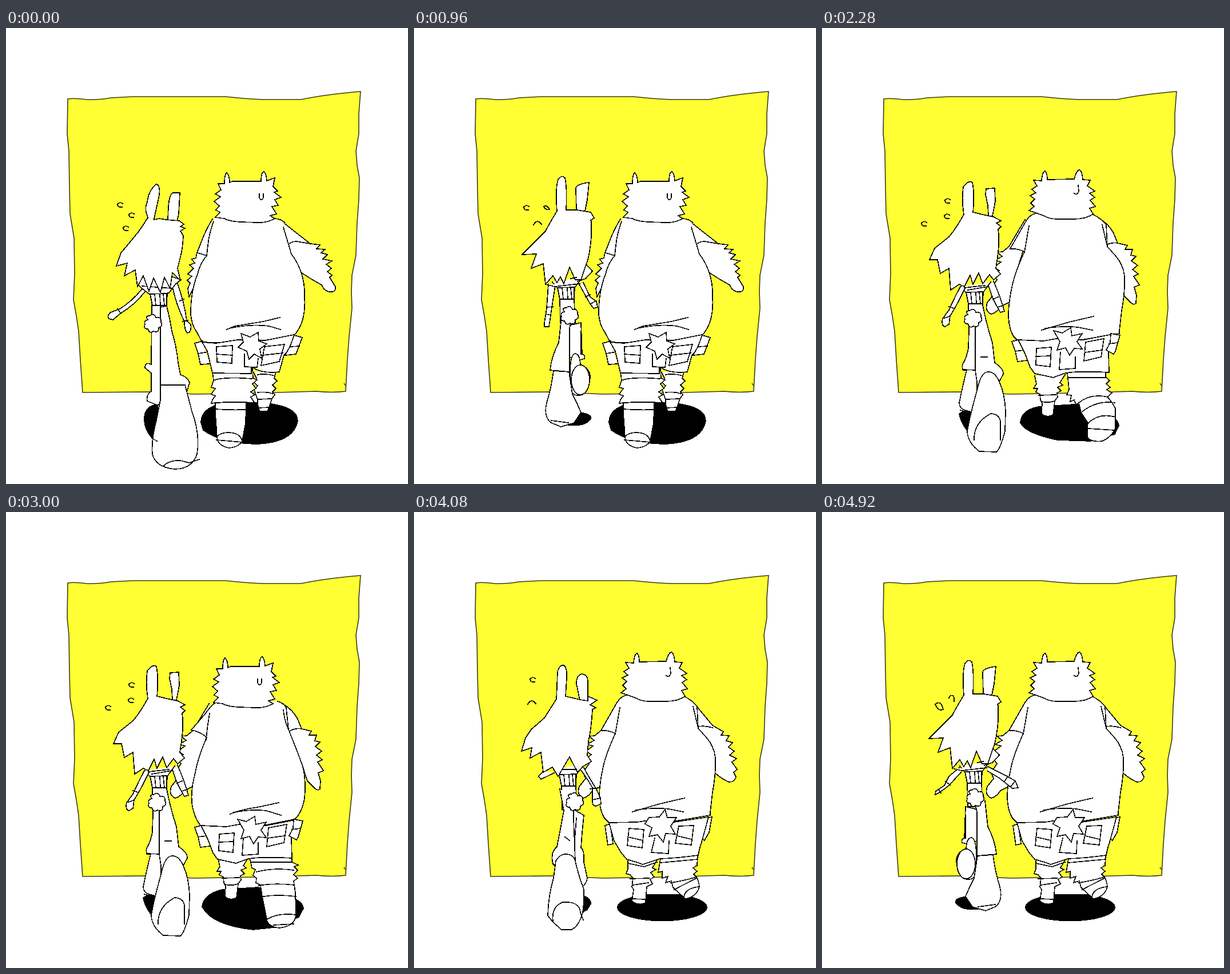
These frames come from a looping animation (703 by 797 pixels, 5040 ms). An HTML page:

```html
<!DOCTYPE html>
<html lang="en">
<head>
<meta charset="utf-8">
<title>Walk</title>
<style>
html, body { margin: 0; width: 100%; height: 100%; overflow: hidden; background: #fff; }
svg { display: block; width: 703px; height: 797px; }
.ink { fill: #fff; stroke: #000; stroke-width: 1.6; stroke-linejoin: round; stroke-linecap: round; shape-rendering: crispEdges; }
.l { fill: none; }
.s { fill: #000; }
.hop, .long, .short { visibility: hidden; animation: hop .72s step-end infinite; }
.long { animation: long .84s step-end infinite; }
.short { animation: short .84s step-end infinite; }
@keyframes hop { 0% { visibility: visible } 16.6666%, 100% { visibility: hidden } }
@keyframes long { 0% { visibility: visible } 21.4285%, 100% { visibility: hidden } }
@keyframes short { 0% { visibility: visible } 14.2857%, 100% { visibility: hidden } }
</style>
</head>
<body>
<svg viewBox="0 0 703 797">
<defs>
  <!-- bear: heads -->
  <g id="headA">
    <path d="M366 331L374 322 367 318 373 311 364 303 375 295 366 290 376 283 371 272 382 272Q382 256 386 253 391 258 391 270L396 268H446Q446 253 451 251 455 254 456 267L470 262 467 277 475 285 469 287 481 296 470 300 476 310 465 312 473 325 462 328 470 333Q455 341 440 340L410 339Q390 338 382 333Z"/>
    <path class="l" d="M443 290Q442 300 447 300 451 299 450 290"/>
  </g>
  <g id="headB">
    <path d="M374 320L362 316 371 309 365 303 372 296 364 290 374 285 367 279 376 273 370 263 384 264Q385 249 390 247 394 250 394 262L441 261Q445 246 450 245 455 247 456 262L469 263 464 273 477 282 468 286 477 293 469 298 478 309 468 312 474 322Q462 331 440 331H410Q395 330 390 326Z"/>
    <path class="l" d="M441 286Q447 290 449 282L448 272"/>
  </g>

  <!-- bear: arms and bodies -->
  <path id="armL" d="M355 335L327 382 316 391 306 392 315 399 303 406 313 409 301 418 310 424 300 432 306 440 296 455 300 466 289 480Q284 495 296 500 305 498 312 487L330 478 333 450 352 388"/>
  <path id="armR" d="M485 336Q502 346 510 362L517 379 534 383 530 390 543 390 540 400 549 402 541 410 552 418 543 425 553 433 545 437 555 452 546 456 550 470 549 484Q545 488 540 483L527 470Q522 455 519 445L494 384M494 384Q505 377 517 379"/>
  <g id="bodyA">
    <path d="M361 334Q354 345 345 365L334 393 332 402 325 404 330 411 321 414 328 420 318 430 325 434 317 441 322 446 318 455 320 470L335 440 351 398M334 393Q340 394 351 398"/>
    <path d="M485 340L500 352 532 377 549 379 543 386 558 387 551 393 562 396 554 404 570 407 560 413 569 420 562 426 570 432 566 436 576 452Q577 461 570 461 562 462 556 456L552 449Q535 440 517 428 505 413 493 381M493 381Q496 373 508 373L532 377"/>
    <path d="M363 338Q355 360 353 380L351 398Q340 410 335 430 323 460 323 500 325 520 334 532L343 549 430 552 500 540Q508 535 515 520 524 500 522 470 523 450 517 430 512 412 499 395L485 348"/>
    <path d="M366 331L363 338 485 348 487 340 470 333Z" stroke="none"/>
    <path class="l" d="M470 333Q482 334 487 340M386 527L400 521 450 513 479 506M395 524Q430 517 460 521L480 527"/>
  </g>
  <g id="bodyB">
    <path d="M372 320Q362 322 355 333L327 382Q340 381 352 387 335 425 331 445 325 470 324 495 324 520 333 535L341 543H440L518 530V525L522 490Q528 460 527 430 525 410 512 395L497 378 495 340Q488 330 472 322"/>
    <path class="l" d="M360 342L352 388M488 340L497 378M382 524L430 510 473 500M388 521Q420 516 445 519L471 524"/>
  </g>
  <g id="bodyE">
    <path d="M372 328Q355 342 349 352L324 381Q340 384 351 394 335 430 330 460 322 490 326 515 330 535 340 548L430 552 505 537Q518 525 522 500 525 470 519 445 512 425 500 395L494 380 490 342Q486 334 475 331"/>
    <path class="l" d="M356 352L352 378 350 398M485 346Q487 365 494 380M392 528Q410 520 440 516L477 508M398 525Q430 519 455 522L481 530"/>
  </g>

  <!-- bear: shorts -->
  <g id="shortsA">
    <path d="M344 547L330 551 336 569 340 588 356 587M336 569L354 566"/>
    <path d="M343 549L367 551 405 545 453 546 504 536 497 560 486 572 478 601Q455 604 438 597L429 592V604L361 603 358 590 352 565Z"/>
    <path d="M504 537L518 541 507 570 488 572 496 558ZM497 557L513 556M368 557L396 555 395 586 369 584ZM368 570L396 572M452 557L487 553 478 583 446 590ZM448 572L484 568M417 570V592L439 593 441 578"/>
    <path d="M411 534L427 540 441 532 442 547 456 552 444 561 447 577 434 570 425 579 421 565 406 558 415 549Z"/>
  </g>
  <g id="shortsB">
    <path d="M334 548L343 545 348 580 339 582ZM510 535L521 533 516 560 508 574 502 570 508 555Z"/>
    <path d="M341 543L390 542 410 539 455 542 515 533 505 570 499 590 497 600Q460 605 430 606L400 616Q390 612 372 607L362 595 350 575Z"/>
    <path d="M376 553L402 555 399 587 373 583ZM374 568L400 574M463 549L489 548 485 582 457 579ZM460 566L485 572M421 570L415 595 445 597 446 575"/>
    <path d="M404 545L411 534 429 533 439 520 443 534 459 534 449 549 457 563 440 562 436 577 426 564 411 567 416 552Z"/>
  </g>
  <g id="shortsE">
    <path d="M341 548L330 551 336 568 340 586 356 584M336 568L351 566"/>
    <path d="M341 548L385 550 408 546 455 548 507 538 499 570 500 605Q450 602 424 606L402 614Q395 612 370 607L362 596 353 572Z"/>
    <path d="M503 537L519 540 511 568 508 573 495 566 502 553ZM500 555L515 553M373 563L399 561 397 595 372 592ZM372 577L398 576M459 552L491 546 486 578 456 585ZM458 570L487 566M415 570L413 600 441 598V578"/>
  </g>
  <path id="starE" d="M405 537L420 541 435 532 437 546 455 542 446 556 455 569 441 568 433 580 426 567 411 571 416 556Z"/>

  <!-- bear: legs and shadows -->
  <path id="farA" d="M473 598L469 612 474 617 466 624 472 630 466 636 470 641 465 648 461 660 457 670H444L441 664 440 650 434 632 440 625 434 620 438 612 433 602M440 606Q455 603 470 608M440 637Q455 635 466 639M441 649L465 648M441 664L461 663"/>
  <g id="nearA">
    <path d="M361 600L363 616 359 628 366 630 359 640 366 643 361 650 359 656 366 655V672L369 715Q370 730 390 734 408 732 413 722L419 690 420 656 434 654 428 645 435 641 428 636 437 630 431 622 439 615 432 612 431 594"/>
    <path class="l" d="M363 616Q380 609 430 613M359 656Q395 652 434 655M366 666Q390 668 420 667M369 714Q375 707 390 707 410 708 413 722M368 720L414 724"/>
  </g>
  <path id="shadeA" class="s" d="M341 690Q341 666 372 658L440 655Q510 658 510 687 503 724 440 727 380 727 345 703Z"/>
  <g id="legsB">
    <ellipse class="s" cx="434" cy="691" rx="78" ry="23.500"/>
    <path d="M410 640H450L470 668H408Z" stroke="none"/>
    <path d="M374 610V624L371 632 378 634 383 640 381 655 384 660 381 680Q393 689 405 683L407 655 417 650 413 642 420 638 414 630 423 625 417 622 425 608M374 614L402 620 425 612M378 641L411 640M383 652L410 648M381 676L405 677"/>
    <path d="M431 606L427 630 434 628V640L444 637 440 648 450 645 453 656Q465 668 475 676 495 672 499 655 498 645 494 638L489 633 495 628 488 622 495 618 496 600M431 613L496 607"/>
    <path class="l" d="M449 648Q470 645 494 638M455 660L494 640M472 672Q475 657 499 655"/>
  </g>
  <path id="farE" d="M371 606L374 620 369 628 376 628 373 634 380 638 381 648 384 654 383 672Q392 680 403 674L406 650 411 643 410 636 417 632 411 626 420 622 415 618 424 604M378 640L408 639M383 651Q395 654 405 650"/>
  <g id="nearE">
    <path d="M426 604L430 622 436 625 432 635 438 640 437 648 445 652 448 672 456 712Q458 725 478 727 505 724 507 705L506 665 503 645 510 640 503 634 510 626 504 620 511 617 500 612V602M428 612H500"/>
    <path class="l" d="M438 629Q470 621 503 626M442 653Q470 648 504 652M450 672Q475 668 507 672M456 712Q475 700 507 704M468 722L503 720"/>
  </g>
  <g id="nearD">
    <path d="M429 602L432 632 428 641 436 642 434 653 441 650 444 658 449 655 453 672 465 690Q462 712 466 718 475 724 490 722 505 716 513 700V665Q505 650 499 645L507 638 498 632 504 628 497 622 503 616 496 610V600M430 611H496"/>
    <path class="l" d="M449 655Q470 638 500 645M453 672Q480 650 512 655M466 690Q485 672 513 680M465 700L512 703"/>
  </g>
  <path id="shadeD" class="s" d="M347 690Q348 668 378 662L455 657Q519 675 519 695L512 710 470 722 411 720Q355 708 347 690Z"/>

  <!-- rabbit: shared bits -->
  <path id="tail" d="M-9-7Q-14-14-6-14 2-20 5-11 15-13 14-3 18 4 10 7 10 17 1 13-6 18-9 9-17 9-14 1-16-6-9-7Z"/>
  <path id="waist" d="M-24-26L-14-14-11 4-10 45H16L14 4 15-16 28-34"/>
  <path id="chest" d="M-15-16L14-17 14 4-11 4ZM-7-16L-5 4M2-16L3 4M8-16L10 4"/>
  <path id="drop" class="l" d="M4-2Q-1-6-5-1-5 5 3 4"/>
  <path id="arch" class="l" d="M-8 3Q-4-5 2-2L6 2"/>

  <g id="hair0">
    <path d="M249 334L245 322Q243 312 247 304 250 282 263 273 270 274 268 292L259 333M283 336L284 312Q286 288 293 288H304L302 325 298 342"/>
    <path d="M247 333Q240 345 231 357L212 380 201 393 193 416 212 411 207 433 226 423 230 452 240 433 250 460 258 437 270 462 277 436 287 455 291 428 305 441 300 420 305 400Q309 385 310 363L305 355 313 350 305 347 311 343 303 337 280 335 268 333 259 335"/>
  </g>
  <g id="hair1">
    <path d="M250 320Q247 280 252 265 258 256 264 262 268 280 266 318M284 318L283 280Q284 273 306 270L303 300 299 320"/>
    <path d="M301 413L312 425 300 438 286 443"/>
    <path d="M250 320Q235 345 230 355L205 380 189 396 214 395 205 420 226 412 230 448 243 433 250 445 256 435 262 447 272 418 282 440 292 440 301 413Q307 400 310 365V338L309 336 315 332 309 322 285 318H266M274 438L284 436M230 448L246 452 290 447"/>
  </g>

  <!-- rabbit: legs -->
  <g id="legs0">
    <path class="s" d="M265 658Q244 660 242 680 240 700 258 720L264 690Z"/>
    <path d="M255 484L254 588Q243 583 243 594L254 603V635Q245 640 247 652L262 658Q268 660 270 654L271 486"/>
    <path d="M270 488L281 486Q287 510 290 530 298 555 301 585L305 606Q318 610 321 620L316 636 270 640Z"/>
    <path d="M270 624L313 624Q320 650 325 670 340 710 334 745 325 771 295 771 262 768 256 745 254 720 262 690L270 650Z"/>
    <path class="l" d="M275 766Q285 755 305 756L320 760 338 754M257 718L264 722"/>
  </g>
  <g id="legs1">
    <path class="s" d="M270 694L290 672Q312 675 309 683 300 697 270 694Z"/>
    <path d="M271 520L292 515 294 570Q300 572 298 578L290 580 272 575ZM292 530V570"/>
    <path d="M273 605Q273 570 282 569 290 570 291 588 308 595 308 610 306 640 290 642 276 643 275 632Z"/>
    <ellipse class="l" cx="291" cy="615" rx="16" ry="26"/>
    <path d="M258 505L253 550Q240 575 238 598L272 601V525L276 505"/>
    <path d="M244 599Q240 630 232 655 226 680 240 690L257 697 280 690 292 672Q285 655 277 640L271 601ZM240 686L270 690"/>
  </g>
  <g id="arms6">
    <path d="M240 447L222 462 214 478 199 488 198 494 206 490 222 478 243 455M216 471L224 477M204 485L208 491"/>
    <path d="M290 445L320 460 338 470 343 482 333 483 310 465 290 453M325 462L319 471M338 470L331 479"/>
  </g>
</defs>

<path d="M108 124Q120 122 140 125 160 126 184 122L222 120H384Q420 124 448 125H516Q560 116 620 111L617 150V185L612 215 614 240 618 262 617 300 614 340 612 397 605 432 604 460 605 490 600 540 597 580 594 635Q570 638 543 635L440 638 330 640 250 636 134 637 130 580 127 530 123 503 118 475 120 430 119 367 112 325 111 280 110 215 107 185ZM591 621L594 625" fill="#ff3" stroke="#3c3c14" stroke-width="1.600"/>

<g class="ink">
  <!-- bear, 840 ms stride -->
  <g class="long" style="animation-delay:-840ms">
    <use href="#shadeA"/><use href="#farA"/><use href="#nearA"/><use href="#bodyA"/><use href="#shortsA"/><use href="#headA"/>
  </g>
  <g class="short" style="animation-delay:-660ms">
    <use href="#shadeD" transform="matrix(-1 0 0 1 860 0)"/><use href="#farA"/><use href="#nearD" transform="matrix(-1 0 0 1 866 -2)"/>
    <g transform="translate(0 -5)"><use href="#bodyA"/><use href="#shortsA"/><use href="#headA"/></g>
  </g>
  <g class="short" style="animation-delay:-540ms">
    <use href="#legsB" transform="matrix(-1 0 0 1 864 0)"/>
    <use href="#bodyA" y="-9"/><use href="#shortsB" transform="matrix(-1 0 0 1 862 0)"/><use href="#headA" y="-11"/>
  </g>
  <g class="long" style="animation-delay:-420ms">
    <path class="s" d="M343 690Q345 668 378 660L440 656Q520 672 520 693L512 708 470 726 432 730Q360 722 343 690Z"/>
    <use href="#farE"/><use href="#nearE"/><use href="#armL"/><use href="#armR"/><use href="#bodyE"/><use href="#shortsE"/><use href="#starE"/><use href="#headA" x="-3" y="2"/>
  </g>
  <g class="short" style="animation-delay:-240ms">
    <use href="#shadeD"/><use href="#farE" x="1" y="2"/><use href="#nearD"/><use href="#armL"/><use href="#armR" y="-3"/><use href="#bodyB" x="2" y="4"/><use href="#shortsE" x="2" y="-3"/><use href="#starE" y="-8"/><use href="#headB" y="3"/>
  </g>
  <g class="short" style="animation-delay:-120ms">
    <use href="#legsB"/><use href="#armL"/>
    <path d="M493 338L522 373 541 384 537 390 551 391 546 400 557 403 550 411 560 418 552 425 564 431 556 437 565 450 559 455 563 463Q561 472 551 472 540 468 525 455L489 378M489 378Q500 371 522 377"/>
    <use href="#bodyB"/><use href="#shortsB"/><use href="#headB"/>
  </g>

  <!-- rabbit, 720 ms stride -->
  <g class="hop" style="animation-delay:-720ms">
    <use href="#waist" x="267" y="480"/><use href="#legs0"/>
    <path d="M238 456Q220 478 199 491L183 497Q176 503 180 508L187 510 200 499Q225 484 243 461M195 491L201 499"/>
    <path d="M291 452Q298 485 312 513 312 528 317 533 325 532 323 518L316 512Q312 480 300 447M309 513L318 511M304 477L311 474"/>
    <path d="M228 430L229 447 240 457 252 466 285 463 297 447 306 440 291 435M238 451L290 455"/>
    <use href="#chest" x="267" y="481"/><use href="#tail" x="257" y="517"/><use href="#hair0"/>
    <use href="#drop" x="200" y="309"/><use href="#drop" x="220" y="327"/><use href="#drop" x="210" y="350"/>
  </g>
  <g class="hop" style="animation-delay:-600ms">
    <use href="#waist" x="267" y="478"/>
    <path class="s" d="M240 675Q245 668 262 671L255 705Q243 690 240 675Z"/>
    <path d="M256 484L257 527 256 560Q252 578 248 584 243 590 247 598L253 598Q245 630 240 655 240 665 250 668L265 672 271 640V528M246 597L270 598M242 668L264 674"/>
    <path d="M268 520V598L272 625 310 618 317 605Q318 595 302 585L298 550Q288 520 281 484M278 575H289"/>
    <path d="M310 618Q320 640 321 670L320 705Q312 735 305 741L275 740Q255 725 254 705 258 680 272 630 278 602 290 601 302 600 310 618ZM266 720Q265 690 295 674 312 675 312 690V720"/>
    <path d="M242 452Q230 475 222 493L211 508Q208 520 215 522L222 518 224 503Q233 490 250 455M222 487L231 490M214 507L223 504"/>
    <path d="M291 450Q297 470 304 483L312 497 319 495 316 485Q310 465 300 443M299 474L308 470M307 488L317 485"/>
    <use href="#chest" x="267" y="478"/><use href="#tail" x="264" y="508"/>
    <path d="M248 326Q244 300 247 278 257 265 263 270 267 290 264 323M291 327L290 310 286 291 287 281 302 280 303 303 298 329"/>
    <path d="M248 326Q235 350 222 365L197 385 188 405 202 405 207 429 222 420 225 458 240 448 249 452 259 432 264 448 274 428 281 447 293 431 300 440 312 430 304 420 307 400Q311 370 308 352L313 347 305 341 313 337 300 330 285 327 264 322M249 454L285 450M255 458L290 452"/>
    <use href="#drop" x="220" y="302"/><use href="#drop" x="179" y="342"/><use href="#drop" x="219" y="329"/>
  </g>
  <g class="hop" style="animation-delay:-480ms">
    <use href="#waist" x="266" y="470"/><use href="#legs1"/>
    <path d="M235 448L232 490 228 516V522L236 522 239 502 241 488 247 450M232 488L243 487M231 500L239 502"/>
    <path d="M289 448Q300 468 308 482L314 490 321 488 319 478 308 470 296 445M300 470L308 466M309 482L318 477"/>
    <use href="#chest" x="266" y="470"/><use href="#tail" x="272" y="503"/><use href="#hair1"/>
    <use href="#drop" x="197" y="314"/><use href="#arch" x="217" y="341"/>
    <path class="l" d="M227 312Q232 308 237 317 230 319 227 312Z"/>
  </g>
  <g class="hop" style="animation-delay:-360ms">
    <use href="#waist" x="268" y="480"/><use href="#legs0" transform="matrix(-1 0 0 1 546 1)"/>
    <use href="#arms6" x="-1" y="6"/><use href="#chest" x="268" y="480"/><use href="#tail" x="280" y="514"/><use href="#hair0" y="-2"/>
    <use href="#drop" x="187" y="316"/><use href="#drop" x="214" y="322"/>
  </g>
  <g class="hop" style="animation-delay:-240ms">
    <use href="#waist" x="269" y="475"/>
    <path class="s" d="M294 670Q310 675 309 685L303 695 294 700Z"/>
    <path d="M279 520L297 530 294 560 292 587Q298 590 297 612L303 640Q300 655 290 655L279 640ZM284 535L279 600"/>
    <path d="M255 484L262 522Q256 555 250 585 238 595 243 615L250 622 282 610 279 535V500M264 568L272 574"/>
    <path d="M248 610Q255 597 268 598 282 600 283 615L290 640 297 660Q298 680 295 700 288 725 275 730H258Q240 715 234 705 235 670 244 640ZM243 715Q240 690 260 682 290 680 291 700L296 713"/>
    <path d="M226 453L218 462 222 467 245 456"/>
    <path d="M289 448Q300 460 312 482V505Q312 514 318 514L327 510 326 500 318 483Q305 462 297 447M308 484L322 482M312 503L326 500"/>
    <use href="#chest" x="269" y="475"/><use href="#tail" x="281" y="507"/>
    <path d="M249 329L251 280Q254 267 262 268 268 272 267 290L265 323M290 329L284 300Q284 285 294 283 304 285 304 295V331"/>
    <path d="M249 327L228 360 205 380 195 395 188 418 206 412 203 430 222 420 226 455 242 446 252 462 272 428 286 455 295 445 310 436 303 425 305 400Q310 380 312 345L318 342 308 337 320 329 304 322 304 330 290 328 265 322M260 450L284 450"/>
    <use href="#drop" x="208" y="293"/><use href="#arch" x="207" y="333"/>
  </g>
  <g class="hop" style="animation-delay:-120ms">
    <use href="#waist" x="265" y="470"/><use href="#legs1" transform="matrix(-1 0 0 1 543 0)"/>
    <use href="#arms6"/><use href="#chest" x="265" y="470"/><use href="#tail" x="268" y="500"/><use href="#hair1" x="-2"/>
    <path class="l" d="M198 336Q208 328 212 345 203 349 198 336Z"/>
    <path class="l" d="M222 325Q224 319 229 321 232 325 231 331"/>
  </g>
</g>
</svg>
</body>
</html>
```
